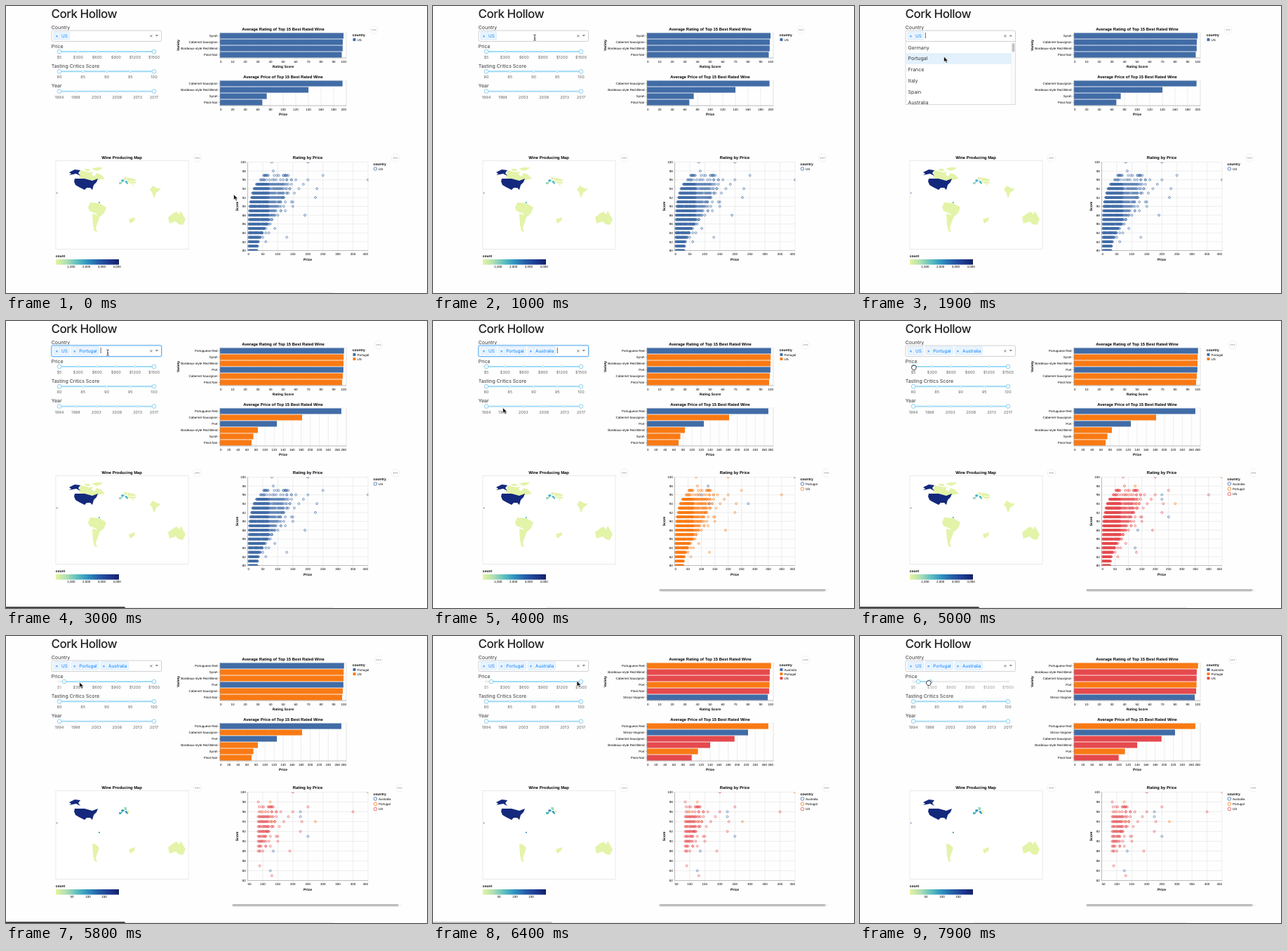
These frames come from a looping animation (600 by 409 pixels, 8 s). An HTML page:

```html
<!DOCTYPE html>
<html lang="en">
<head>
<meta charset="utf-8">
<title>Wine dashboard</title>
<style>
html, body { margin: 0; width: 100%; height: 100%; overflow: hidden; background: #fefefe; }
svg { display: block; width: 600px; height: 409px; }
text { white-space: pre; text-rendering: geometricPrecision; }
.ui { font-family: Inter, "Open Sans", sans-serif; }
.vg { font-family: "Liberation Sans", Arial, sans-serif; }
</style>
</head>
<body>
<svg id="stage" viewBox="0 0 600 409" xmlns="http://www.w3.org/2000/svg"></svg>
<script>
const LOOP = 8000;
const BLUE = '#416ca6', ORANGE = '#f97a14', RED = '#e5494d';
const PALE = '#e3f3a8', NAVY = '#14297c';

// ---------- drawing helpers ----------
const text = (x, y, s, size, o = {}) =>
  `<text class="${o.font || 'vg'}" x="${x}" y="${y + size * .36}" font-size="${size}" fill="${o.fill || '#000'}"` +
  ` text-anchor="${o.anchor || 'start'}"${o.bold ? ' font-weight="700"' : ''}${o.attr || ''}>${s}</text>`;
const mid = (x, y, s, size, bold) => text(x, y, s, size, { anchor: 'middle', bold });
const ui = (x, y, s, size, fill = '#333', anchor) => text(x, y, s, size, { font: 'ui', fill, anchor });
const title = (x, y, s) => mid(x, y, s, 5.85, true);
const upright = (x, y, s) =>
  text(0, 0, s, 4.95, { anchor: 'middle', bold: true, attr: ` transform="translate(${x} ${y}) rotate(-90)"` });
const rect = (x, y, w, h, fill, more = '') =>
  `<rect x="${x}" y="${y}" width="${w}" height="${h}" fill="${fill}" ${more}/>`;
const line = (x1, y1, x2, y2, c, w = .5) =>
  `<path d="M${x1} ${y1}L${x2} ${y2}" stroke="${c}" stroke-width="${w}"/>`;
const ring = (x, y, r, c, w, fill = 'none') =>
  `<circle cx="${x}" cy="${y}" r="${r}" stroke="${c}" stroke-width="${w}" fill="${fill}"/>`;
const path = (d, fill, more = '') => `<path d="${d}" fill="${fill}" ${more}/>`;
const group = (id, body = '') => `<g id="${id}">${body}</g>`;
const range = (a, b, step = 1) => Array.from({ length: Math.floor((b - a) / step) + 1 }, (_, i) => a + i * step);
const menuDots = (x, y) => ring(x, y, 5.6, '#e9e9e9', .7, '#fff') +
  [-2.3, 0, 2.3].map(d => `<circle cx="${x + d}" cy="${y}" r=".75" fill="#888"/>`).join('');

// vertical grid with labels; the outer labels stay inside the plot
function xAxis(left, width, top, bottom, min, max, step) {
  return range(min, max, step).map(v => {
    const x = left + (v - min) / (max - min) * width;
    const anchor = v === min ? 'start' : v === max ? 'end' : 'middle';
    return line(x, top, x, bottom + 2.2, '#ddd') + text(x, bottom + 5.3, v, 4.5, { anchor });
  }).join('');
}

// ---------- bar charts ----------
const LEFT = 305, WIDTH = 180, TOP = 38, BAND = 9;

function barPlot(top, name, axis, wines, key, colors, step, max) {
  const bottom = top + wines.length * BAND, center = LEFT + WIDTH / 2;
  let s = title(center, top - 4.9, name) + xAxis(LEFT, WIDTH, top, bottom, 0, max, step) +
    rect(LEFT, top, WIDTH, bottom - top, 'none', 'stroke="#ddd" stroke-width=".5"');
  [...wines].sort((a, b) => b[key] - a[key]).forEach((w, i) => {
    const y = top + BAND * (i + .5);
    s += rect(LEFT, y - 4.05, w[key] / max * WIDTH, 8.1, colors[w.country]) +
      line(LEFT - 2, y, LEFT, y, '#888') + text(LEFT - 3.4, y, w.name, 4.5, { anchor: 'end' });
  });
  return s + line(LEFT, top, LEFT, bottom, '#888') + line(LEFT, bottom, LEFT + WIDTH, bottom, '#888') +
    mid(center, bottom + 12.3, axis, 4.95, true);
}

function barCharts(id, colors, wines, step, max) {
  const h = wines.length * BAND;
  let s = barPlot(TOP, 'Average Rating of Top 15 Best Rated Wine', 'Rating Score', wines, 'rating', colors, 10, 100) +
    barPlot(TOP + h + 32, 'Average Price of Top 15 Best Rated Wine', 'Price', wines, 'price', colors, step, max) +
    upright(245, TOP + h / 2, 'Variety') + text(493.7, 41, 'country', 4.95, { bold: true });
  Object.entries(colors).forEach(([name, c], i) => {
    const y = 48 + i * 6.1;
    s += rect(494.5, y - 2, 3.9, 3.9, c) + text(500.5, y, name, 4.5);
  });
  return group(id, s + menuDots('Portugal' in colors ? 531 : 524.5, 34));
}

const wine = (name, country, rating, price) => ({ name, country, rating, price });
const cabernet = (r, p) => wine('Cabernet Sauvignon', 'US', r, p);
const blend = (r, p) => wine('Bordeaux-style Red Blend', 'US', r, p);
const pinot = (r, p) => wine('Pinot Noir', 'US', r, p);
const syrah = r => wine('Syrah', 'US', r, 74);
const port = (r, p) => wine('Port', 'Portugal', r, p);
const red = wine('Portuguese Red', 'Portugal', 98.2, 269);
const shiraz = wine('Shiraz-Viognier', 'Australia', 95.6, 224);

const oneLand = { US: BLUE };
const twoLands = { Portugal: BLUE, US: ORANGE };
const threeLands = { Australia: BLUE, Portugal: ORANGE, US: RED };
const bars =
  barCharts('bars0', oneLand, [syrah(97.8), cabernet(97.2, 194), blend(97.1, 140), pinot(96.4, 67)], 20, 200) +
  barCharts('bars1', twoLands,
    [red, syrah(97.9), blend(97.8, 84), port(97.7, 126), cabernet(97.2, 182), pinot(96.7, 70)], 20, 280) +
  barCharts('bars2', threeLands,
    [red, blend(97.2, 140), cabernet(97.1, 194), port(97, 113), pinot(96.7, 99), shiraz], 20, 280);

// ---------- scatter plot ----------
let seed = 7;
const rnd = () => (seed = (seed * 16807) % 2147483647) / 2147483647;
const smooth = k => { k = Math.min(1, Math.max(0, k)); return k * k * (3 - 2 * k); };

// each score has a dense band of prices that widens and shifts up, then a thin tail
const points = {
  Australia: [[225, 96], [225, 95], [250, 91], [125, 84], [135, 88]],
  Portugal: [[450, 100], [125, 98], [275, 94], [130, 94], [100, 96]],
  US: [[80, 100], [200, 100], [85, 98], [250, 97], [400, 96], [230, 94], [190, 88], [130, 83]]
};
for (const score of range(80, 97)) {
  const from = 4 + 46 * ((score - 80) / 17) ** 5;
  const to = 32 + 88 * smooth((score - 80) / 14);
  const fill = score > 95 ? .35 : .95;
  for (let p = Math.round(from); p < to; p += p < 70 ? 1 : 3) {
    if (rnd() < fill) points.US.push([p, score]);
  }
  for (let n = Math.round((score - 80) / 2.6); n > 0; n--) {
    points.US.push([Math.round((to - 8 * Math.log(rnd()) * (1 + n / 2)) / 5) * 5, score]);
  }
}

function scatter(id, colors, minPrice, maxPrice, minScore, cutoff) {
  const left = 344.5, top = 222.5, bottom = 348.5, width = 171.5;
  const sx = p => left + (p - minPrice) / (maxPrice - minPrice) * width;
  const sy = v => bottom - (v - minScore) / (100 - minScore) * (bottom - top);
  let s = title(430, 215.5, 'Rating by Price') + xAxis(left, width, top, bottom, minPrice, maxPrice, 50);
  for (const v of range(minScore, 100, 2)) {
    s += line(left - 2, sy(v), left + width, sy(v), '#ddd') + text(left - 2.7, sy(v), v, 4.5, { anchor: 'end' });
  }
  s += '<g clip-path="url(#plot)" stroke-opacity=".8">';
  for (const land of Object.keys(colors).reverse()) {
    for (const [p, v] of points[land]) {
      if (p >= cutoff) s += ring(sx(p).toFixed(1), sy(v).toFixed(1), 1.45, colors[land], .85);
    }
  }
  s += '</g>' + line(left, top, left, bottom, '#888') + line(left, bottom, left + width, bottom, '#888') +
    mid(430, 361.3, 'Price', 4.95, true) + upright(329.5, 285.5, 'Score') +
    text(523.6, 225, 'country', 4.95, { bold: true });
  Object.entries(colors).forEach(([name, c], i) => {
    const y = 232 + i * 7.3;
    s += ring(526.4, y, 2.3, c, .8) + text(531, y, name, 4.5);
  });
  if (colors === oneLand) s += menuDots(555, 216.5);
  else s += `<g clip-path="url(#pane)">${menuDots(561, 216.5)}</g>` +
    rect(322, 381.8, 242, 4, '#f7f7f7') + rect(322.5, 382, 237, 3.2, '#bdbdbd', 'rx="1.6"');
  return group(id, s);
}
const scatters =
  scatter('dots0', oneLand, 0, 400, 80, 0) + scatter('dots1', twoLands, 0, 450, 80, 0) +
  scatter('dots2', threeLands, 0, 450, 80, 0) + scatter('dots3', threeLands, 50, 450, 82, 83);

// ---------- map ----------
const land = {
  us: 'M98 246H112L123 249 131 246 129 251 125 255 123 262 120 259 115 259 112 262 104 258 99 255 97 250Z',
  alaska: 'M106 234L98 233 90 237 93 239 90 241 100 239 106 242 103 238Z',
  hawaii: 'M72 266h1.2v1h-1.2Z',
  canada: 'M106 234L119 237 124 236 122 240 126 243 129 238 135 240 141 246 131 248 123 249 112 246 104 245Z' +
    'M111 232h7l3 3h-7ZM122 232l7-2h9l-3 3-6 2Z',
  brazil: 'M117 287L120 280 133 281 143 287 140 295 131 303 129 296 119 292Z',
  cone: 'M123 296L128 297 133 302 129 313 128 317 130 322 126 321 124 312Z',
  guiana: 'M132 279h1.6v2h-1.6Z',
  east: 'M171 245L177 245 184 247 185 250 175 249ZM176 250L186 251 184 253 177 253ZM180 254h1.5v2h-1.5Z',
  france: 'M164 248L167 247 169 249 165 251Z',
  spain: 'M161 251L166 251 164 254 161 254Z',
  italy: 'M169 250L172 249 174 253 173 254Z',
  german: 'M168 244L172 244 172 248 169 248Z',
  balkan: 'M173 248L176 249 175 253 174 252Z',
  india: 'M205 262L209 256 216 260 221 260 217 264 214 266 211 274 208 265Z',
  africa: 'M175 304L184 301 183 306 177 310Z',
  oz: 'M231 301L239 295 243 293 247 297 249 292 256 304 252 312 246 311 242 307 233 310Z'
};
const shade = (names, c) => names.split(' ').map(n => path(land[n], c)).join('');
const home = shade('us alaska hawaii', NAVY);
const counts = (labels, gap) => labels.map((l, i) => mid(71 + (i + 1) * gap, 371.5, l, 4.5)).join('');
const map = title(165, 215.5, 'Wine Producing Map') +
  rect(71, 220.5, 189, 126, '#fff', 'stroke="#ddd" stroke-width=".6"') + menuDots(272.5, 216.5) +
  text(70.7, 356.5, 'count', 4.95, { bold: true }) + rect(71, 361, 90, 7.6, 'url(#ramp)') +
  group('map0', shade('canada brazil cone east german balkan india africa oz', PALE) + home +
    shade('spain', '#9ad8b9') + shade('france italy guiana', '#41b3c3') +
    counts(['1,000', '2,000', '3,000', '4,000'], 21.8)) +
  group('map1', shade('cone africa oz balkan', PALE) + home + shade('german', '#9ad8b9') +
    shade('spain', '#4ab9bd') + shade('france italy guiana', '#2b91b9') + counts(['50', '100', '150'], 23));

// ---------- filters ----------
const LOW = 76, HIGH = 211, trackY = i => 65 + i * 28.3;

function slider(i, values, pre = '', lo = LOW, hi = HIGH) {
  const y = trackY(i), first = values[0], last = values[values.length - 1];
  let s = line(LOW, y, HIGH, y, '#e9e9e9', 1.9) + line(lo, y, hi, y, '#9fdcf9', 1.9);
  for (const v of values) {
    const x = LOW + (v - first) / (last - first) * (HIGH - LOW), on = x >= lo - .1 && x <= hi + .1;
    s += ring(x, y, 1.5, on ? '#96dbfa' : '#e2e2e2', .8, '#fff') +
      ui(x, y + 8, pre + v, 5.6, on ? '#666' : '#999', 'middle');
  }
  return s + [lo, hi].map(x => ring(x, y, 2.8, '#88d2f7', 1, '#fff')).join('');
}
const prices = [5, ...range(300, 1500, 300)];

const caretX = [];
let chipX = 68;
const chips = [['US', 22.3], ['Portugal', 38.8], ['Australia', 39.2]].map(([name, w], i) => {
  const x = chipX;
  caretX.push(chipX += w + 3);
  return group('chip' + i, rect(x, 36.8, w, 11, '#ebf5ff', 'rx="1" stroke="#c2e0ff" stroke-width=".6"') +
    line(x + 8.5, 36.8, x + 8.5, 47.8, '#d5e9ff') +
    ui(x + 4.3, 42.2, '×', 6.5, '#007eff', 'middle') + ui(x + 11, 42.3, name, 6.4, '#007eff'));
}).join('');

function dropdown(id, names, hover) {
  let s = rect(65, 50.5, 156.5, 90, '#fff', 'stroke="#ccc" stroke-width=".7"') + '<g clip-path="url(#list)">';
  names.forEach((n, i) => {
    const y = 59.2 + i * 15.7;
    if (n === hover) s += rect(65.4, y - 7.8, 150.2, 15.7, '#e2f1fc');
    s += ui(68.6, y, n, 7);
  });
  return group(id, s + rect(215.6, 51, 5.6, 89, '#fafafa', 'stroke="#e6e6e6" stroke-width=".4"') +
    rect(216.7, 53, 3.6, 12.5, '#c1c1c1', 'rx="1.8"') + '</g>');
}

const filters =
  `<text class="ui" x="64.5" y="17" font-size="17" font-weight="500" letter-spacing="-.5" fill="#222">Cork Hollow</text>` +
  ui(64.7, 30, 'Country', 7) +
  ['Price', 'Tasting Critics Score', 'Year'].map((s, i) => ui(64.7, trackY(i) - 8, s, 7)).join('') +
  group('price') + slider(1, range(80, 100, 5)) + slider(2, [1994, 1998, 2003, 2008, 2013, 2017]) +
  group('glow', rect(64.3, 34.3, 158, 16.8, 'none', 'rx="2.5" stroke="#cfe8fc" stroke-width="1.6"')) +
  rect(65, 35, 156.5, 15.4, '#fff', 'id="field" rx="1.8" stroke-width=".8"') + chips +
  path('M0 37.8V46', 'none', 'id="caret" stroke="#222" stroke-width=".7"') +
  ui(206.8, 42, '×', 8, '#777', 'middle') + path('M-2.3 -1.1H2.3L0 1.3Z', '#888', 'id="arrow"') +
  dropdown('list0', ['Germany', 'Portugal', 'France', 'Italy', 'Spain', 'Australia'], 'Portugal') +
  dropdown('list1', ['Germany', 'France', 'Italy', 'Spain', 'Australia', 'Chile'], 'Australia');

// ---------- pointer ----------
const pointer = group('cursor',
  group('arrowShape', path('M0 0V8L2 6 3 9 5 8.5 3.5 6H6Z', '#111', 'stroke="#fff" stroke-width=".6"')) +
  group('beamShape', path('M-1.8 -4Q0 -4 0 -3V3Q0 4 -1.8 4M1.8 -4Q0 -4 0 -3M0 3Q0 4 1.8 4M-1 .8H1', 'none',
    'stroke="#222" stroke-width=".8"')) +
  group('handShape', path('M-3 -1Q-2.5 -3 -1 -2.5 0 -3.5 1 -2.5 3 -3 3 -1V1Q2.5 3 1.5 3.8H-1.5Q-3.5 2 -3.5 .5Z',
    '#fff', 'stroke="#222" stroke-width=".9"')));

const stops = ['#e4f49d', '#b0dfb4', '#5fc0c0', '#2f93c0', '#2560a8', '#1f3b93', '#122068'];
document.getElementById('stage').innerHTML =
  '<defs><linearGradient id="ramp">' +
  stops.map((c, i) => `<stop offset="${i / (stops.length - 1)}" stop-color="${c}"/>`).join('') +
  '</linearGradient>' +
  `<clipPath id="plot">${rect(344, 222, 172.5, 127)}</clipPath>` +
  `<clipPath id="pane">${rect(322, 205, 242, 180)}</clipPath>` +
  `<clipPath id="list">${rect(65.3, 50.8, 156, 89.4)}</clipPath></defs>` +
  rect(0, 0, 600, 409, '#fefefe') + bars + map + scatters + filters +
  rect(162, 407.6, 304, 1.4, '#eee') + rect(-2, 407.2, 172, 4, '#3a3a3a', 'id="status" rx="1.5"') + pointer;

// ---------- timeline ----------
const el = {};
document.querySelectorAll('[id]').forEach(n => el[n.id] = n);
const show = (id, on) => { el[id].style.display = on ? '' : 'none'; };
const pick = (prefix, count, chosen) => range(0, count - 1).forEach(i => show(prefix + i, i === chosen));
const phase = (t, ...times) => times.filter(v => t >= v).length;
const during = (t, a, b) => t >= a && t < b;
const ramp = (t, start, span, a, b) => a + (b - a) * smooth((t - start) / span);

// start, duration, end point
const moves = [
  [100, 850, 145, 45], [1300, 500, 119.5, 72], [2050, 500, 145, 45], [3150, 450, 99.5, 123.5],
  [4050, 700, 77, 66], [5050, 300, 84, 66], [5550, 980, 211, 64], [6750, 950, 98, 66.5]
];
const cursorAt = t => moves.reduce(([x, y], [start, span, nx, ny]) =>
  [ramp(t, start, span, x, nx), ramp(t, start, span, y, ny)], [324.5, 268.5]);

function render(t) {
  pick('bars', 3, phase(t, 2600, 6000));
  pick('dots', 4, phase(t, 3300, 4400, 5550));
  pick('map', 2, phase(t, 5700));

  const open0 = during(t, 1200, 2050), open1 = during(t, 3150, 3920), open = open0 || open1;
  const focused = during(t, 1200, 4850), added = phase(t, 2050, 3920);
  show('list0', open0);
  show('list1', open1);
  show('chip1', added > 0);
  show('chip2', added > 1);
  show('caret', focused);
  show('glow', focused && !open);
  el.caret.setAttribute('transform', `translate(${caretX[added]} 0)`);
  el.arrow.setAttribute('transform', `translate(214.8 42.2) scale(1 ${open ? -1 : 1})`);
  el.field.setAttribute('stroke', focused && !open ? '#3d9be9' : '#c4c4c4');
  el.price.innerHTML = slider(0, prices, '$', ramp(t, 5050, 300, LOW, 83), ramp(t, 6750, 950, HIGH, 100));

  show('status', during(t, 2100, 3300) || during(t, 4200, 6600));
  el.status.setAttribute('fill', t < 6000 ? '#3a3a3a' : '#c4c4c4');

  const [x, y] = cursorAt(t);
  const hand = during(t, 4850, 5500) || t >= 6600;
  const beam = !hand && !open && during(x, 91, 202) && during(y, 36, 50);
  show('handShape', hand);
  show('beamShape', beam);
  show('arrowShape', !hand && !beam);
  el.cursor.setAttribute('transform', `translate(${x.toFixed(2)} ${y.toFixed(2)})`);
}

const start = performance.now();
function tick() {
  render((performance.now() - start) % LOOP);
  requestAnimationFrame(tick);
}
tick();
</script>
</body>
</html>
```
